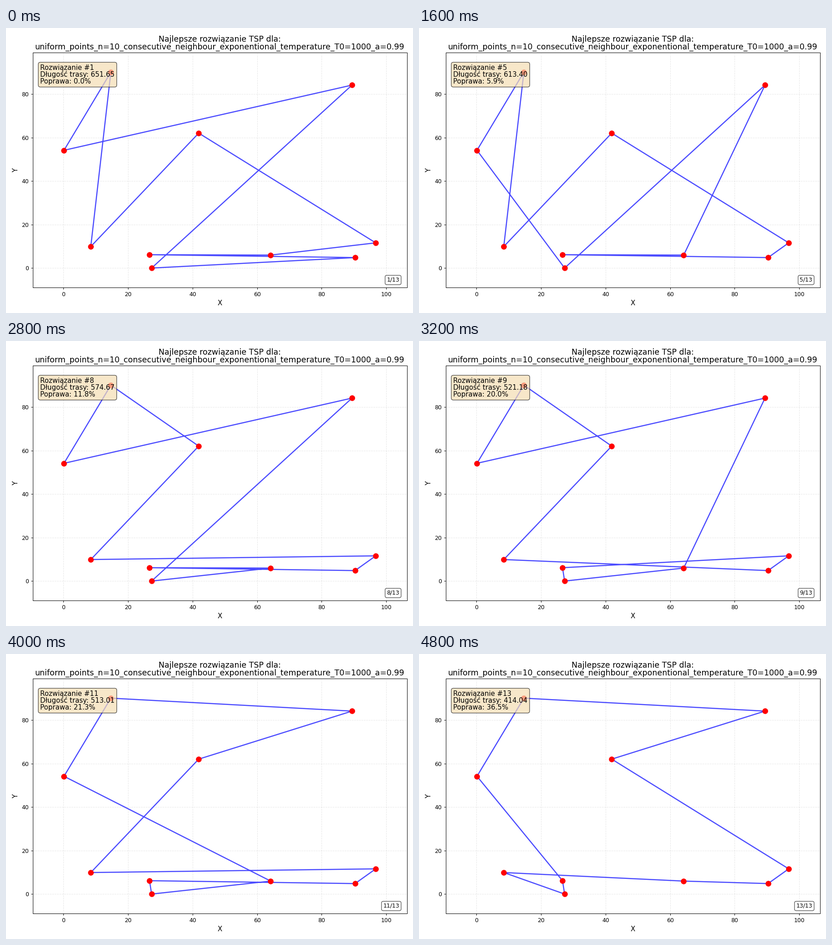
Write a matplotlib script that moves like this. It is 894 px wide and 626 px high and loops after 5200 ms.

```python
import matplotlib.pyplot as plt
from matplotlib.animation import FuncAnimation

WIDTH, HEIGHT, DPI = 894, 626, 89.4
LAYOUT_DPI = 100  # margins and line spacing are worked out at this resolution

CITIES = {
    "A": (14.67, 90.16), "B": (89.40, 84.20), "C": (0.15, 54.20),
    "D": (41.90, 62.10), "E": (8.45, 9.90), "F": (96.75, 11.60),
    "G": (26.65, 6.15), "H": (64.20, 5.97), "I": (27.30, 0.00),
    "J": (90.35, 4.82),
}

# Successive best tours with their lengths
TOURS = [
    ("CAEDFHGJIB", 651.65),
    ("CAEDFHGJBI", 634.28),
    ("CAEDFGHJBI", 634.03),
    ("CEADFGHJBI", 617.45),
    ("CAEDFJGHBI", 613.40),
    ("CAEDFJGHIB", 602.17),
    ("CADEFJGHBI", 585.87),
    ("CADEFJGHIB", 574.67),
    ("CADEJFGIHB", 521.18),
    ("CADEFJGIHB", 520.85),
    ("CABDEFJGIH", 513.01),
    ("CABDFJEHIG", 485.97),
    ("CABDFJHEIG", 414.04),
]


def fit_spacing(text):
    """Give a block of lines its layout height, scaled to the stage."""
    goal = text.get_window_extent(dpi=LAYOUT_DPI).height * DPI / LAYOUT_DPI

    def height(spacing):
        text.set_linespacing(spacing)
        return text.get_window_extent().height

    low, high = height(1), height(2)
    text.set_linespacing(1 + (goal - low) / (high - low))


plt.rcParams["font.family"] = "DejaVu Sans"
fig, ax = plt.subplots(figsize=(WIDTH / DPI, HEIGHT / DPI), dpi=DPI)

title = ax.set_title(
    "Najlepsze rozwiązanie TSP dla:\n"
    "uniform_points_n=10_consecutive_neighbour_"
    "exponentional_temperature_T0=1000_a=0.99",
    fontsize=14,
)
ax.set_xlabel("X", fontsize=12)
ax.set_ylabel("Y", fontsize=12)
ax.set_xlim(-9.51, 106.41)
ax.set_ylim(-9.02, 99.18)
ax.grid(True, linestyle="--", alpha=0.3)

route, = ax.plot([], [], "b-", lw=2, alpha=0.7)
ax.plot(*zip(*CITIES.values()), "ro", ms=9.1, mew=1, zorder=3)

info = ax.text(
    0.02, 0.95, "", transform=ax.transAxes, fontsize=12, va="top",
    bbox=dict(boxstyle="round", facecolor="wheat", alpha=0.7), zorder=5,
)
counter = ax.text(
    0.98, 0.02, "", transform=ax.transAxes, fontsize=10, ha="right", va="bottom",
    bbox=dict(boxstyle="round", facecolor="white", alpha=0.7), zorder=5,
)


def update(i):
    tour, length = TOURS[i]
    start = TOURS[0][1]
    gain = 100 * (start - length) / start
    route.set_data(*zip(*(CITIES[c] for c in tour + tour[0])))
    info.set_text(
        f"Rozwiązanie #{i + 1}\n"
        f"Długość trasy: {length:.2f}\n"
        f"Poprawa: {gain:.1f}%"
    )
    counter.set_text(f"{i + 1}/{len(TOURS)}")
    return route, info, counter


update(0)
fig.set_dpi(LAYOUT_DPI)
fig.tight_layout()
fig.set_dpi(DPI)
fit_spacing(title)
fit_spacing(info)

anim = FuncAnimation(fig, update, frames=len(TOURS), interval=400,
                     repeat=True, repeat_delay=0, blit=False)
plt.show()
```
